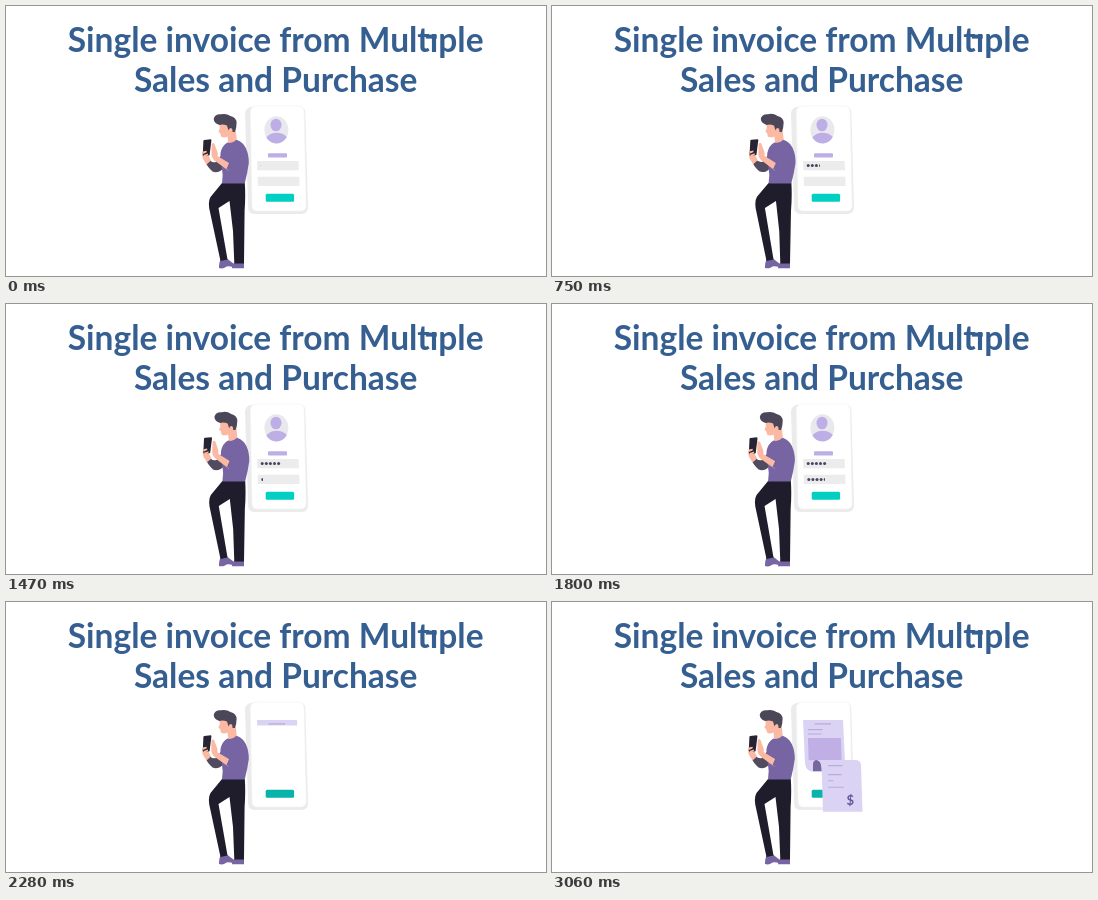
Recreate the animation shown at these times as an HTML page. Size 540 by 270 pixels, loop 3600 ms.

```html
<!DOCTYPE html>
<html lang="en">
<head>
<meta charset="utf-8">
<title>Single invoice</title>
<style>
  html, body { margin: 0; width: 100%; height: 100%; overflow: hidden; background: #fff; }
  svg { display: block; width: 540px; height: 270px; }
  .title { font: 700 33.5px Lato, Carlito, sans-serif; font-variant-ligatures: none; fill: #365f91; text-anchor: middle; }
  .dollar { font: 700 13px Lato, sans-serif; fill: #65549a; text-anchor: middle; }
  .skin { fill: #fbb8a3; }
  .top { fill: #7764a3; }
  .sleeve { fill: #514b60; }
  .pants { fill: #1f1d2b; }
  .hair { fill: #4b4758; }
  .lilac { fill: #bdaee6; }
  .field { fill: #ececec; }
  .dots { fill: #4a4560; }
  .paper { fill: #dad3f4; }
  .lines { stroke: #bbaae0; stroke-width: 1.1; fill: none; }
</style>
</head>
<body>
<svg viewBox="0 0 540 270">
  <defs>
    <clipPath id="clip1"><rect id="type1" x="250" y="150" width="0" height="16"/></clipPath>
    <clipPath id="clip2"><rect id="type2" x="250" y="166" width="0" height="18"/></clipPath>
    <clipPath id="clip3"><rect id="print" x="245" y="118" width="70" height="0"/></clipPath>
  </defs>

  <text class="title" id="line1" x="269.7" y="46">Single invoice from Multiple</text>
  <text class="title" x="269.7" y="86">Sales and Purchase</text>
  <rect id="dot" y="18" height="9" fill="#fff"/>
  <rect id="join" y="28.6" height="4" fill="#365f91"/>

  <!-- phone screen -->
  <path fill="#ebebec" d="M247 100.5H293Q299 100.500 299.300 106L302 201Q302 208 295.500 208H249Q242.500 208 242.200 202L239 108Q239 101 247 100.500Z"/>
  <path fill="#fff" stroke="#f1f1f2" stroke-width=".6" d="M250.500 100H292.500Q298 100 298.200 106L300.200 199Q300 205 294.500 205H251.500Q246.200 205 246 199.500L244.300 106.500Q244.300 100 250.500 100Z"/>
  <g id="form">
    <ellipse cx="270.4" cy="123.8" rx="12" ry="13.600" fill="#e9e8ec"/>
    <ellipse class="lilac" cx="270" cy="119" rx="5.500" ry="6.300"/>
    <path class="lilac" d="M260.300 131.500Q264 126.700 270.500 126.700Q277 126.700 280.900 131Q277 137.400 270.700 137.400Q264 137.400 260.300 131.500Z"/>
    <rect class="lilac" x="262" y="147.200" width="19" height="4.200" rx="1"/>
    <path class="field" d="M251 155H292.500L293 164.300H251.300Z"/>
    <path class="field" d="M251.600 170.700H293.300L293.600 180H252Z"/>
    <g class="dots" id="row1" clip-path="url(#clip1)"></g>
    <g class="dots" id="row2" clip-path="url(#clip2)"></g>
  </g>
  <rect id="button" x="259.700" y="187.800" width="28.400" height="8" rx="1.500"/>

  <!-- receipt -->
  <g clip-path="url(#clip3)">
    <path class="paper" d="M251 118H291L293 160H269V169.500H260Q253.500 168.500 253 161Z"/>
    <path class="lines" d="M262.500 121.900H279M256 127.600H270.500M256 132H269.500"/>
    <path fill="#bfafe4" d="M256 136H288.800L289.600 158.300H256.700Z"/>
    <path fill="#78679f" d="M261 169.300V162.500Q261 158 265 158Q269.700 158.500 269.900 169.300Z"/>
    <path class="paper" d="M265 158H304Q308.800 158.300 309 163L310.500 209.700H271L269.600 166Q269.300 159 265 158Z"/>
    <path class="lines" d="M276 163.600H290.500M276 172.600H289.500M276 178.800H281.500M276 185.200H292"/>
    <text class="dollar" x="298.300" y="202.800">$</text>
  </g>

  <!-- man with phone -->
  <g id="man">
    <path class="top" d="M214.500 253.500L221 252.500Q225 256 229 258.500Q229 261 226 260.700Q221 259.500 219 261.500Q216 263 213 262Q212.800 257 214.500 253.500Z"/>
    <path class="top" d="M228.500 256.500H238V262.300H226Q225.700 260 228.500 256.500Z"/>
    <path class="pants" d="M216 177H238.800Q239.700 190 238.600 205L238 257.500H228.300L227 225L223.500 195L212.500 202L221.500 253.500L214.500 255L204 206Q201.500 196 204.500 191Z"/>
    <path class="sleeve" d="M203 153.500Q206 157 210 156L218 146V162Q212 168 206.500 165.500Q201.500 161 200 157Z"/>
    <path class="skin" d="M197.500 144Q195 148 197 153L200.500 158.500L205 154.500L202.500 149.500L204 145Z"/>
    <path class="skin" d="M213.500 117L213.700 122.500L212.300 126L214 126.800L215 130.500Q217.500 132.300 221.500 130.500L222.500 138.500L231 137L229 116Q221 112 213.500 117Z"/>
    <path class="hair" d="M207.700 113Q208.500 108 215 108.300Q220 107 224.500 110Q230.500 111.500 230.600 117Q230.600 122 228.800 126L226.500 126Q226.700 122 224.500 122Q222.800 122.500 222.500 124.500L221 119.500Q217 118 213.500 119Q208 117.500 207.700 113Z"/>
    <path class="top" d="M221.500 136.500Q226 138 230.600 133.800Q237.500 136.500 239.800 142Q243 149 242.800 157Q241.500 167 238.700 177.500H216Q217.500 169 215.800 161Q213.500 154 214.500 147Q216 139.500 221.500 136.500Z"/>
    <path fill="#262433" d="M198.300 134L204.800 133.300Q205.500 133.600 205.400 134.500L203.600 149.200L198 150Q196.700 149.700 196.800 148.500L197.400 135Q197.500 134.200 198.300 134Z"/>
    <path class="skin" d="M196.700 145.500L200.500 144.700L200.800 146.200L197 148ZM197.500 149L202 147.500L202 149L198 151.500Z"/>
    <g id="hand">
      <path class="skin" d="M205.700 138Q207 136 208.500 138L210.500 143.500Q212.500 147.500 211.500 150L225.500 158.500L222.500 164.700L208.500 154.500Q205 151 205.500 147Z"/>
    </g>
    <path class="top" d="M222.500 153L234 149L237 160Q232 167 225.500 166.300L220.800 163.300L223.800 156.500Z"/>
    <path d="M223.800 156.500L220.800 163.300" stroke="#65538f" stroke-width=".7"/>
  </g>
</svg>
<script>
  const LOOP = 3600, STEP = 30;
  const $ = id => document.getElementById(id);
  const set = (id, attrs) => { for (const k in attrs) $(id).setAttribute(k, attrs[k]); };
  const clamp = v => Math.min(1, Math.max(0, v));
  const span = (t, a, b) => clamp((t - a) / (b - a));
  const mix = (a, b, p) => a + (b - a) * p;

  function addDots(id, x, y) {
    for (let i = 0; i < 5; i++) {
      const c = document.createElementNS("http://www.w3.org/2000/svg", "circle");
      c.setAttribute("cx", x + i * 4.1);
      c.setAttribute("cy", y);
      c.setAttribute("r", 1.5);
      $(id).append(c);
    }
  }
  addDots("row1", 256.2, 159.6);
  addDots("row2", 256.8, 175.5);

  // The "ti" pair shares one crossbar in place of the dot.
  const left = $("line1").getStartPositionOfChar(24).x;
  const right = $("line1").getEndPositionOfChar(24).x;
  set("dot", { x: left + 0.6, width: right - left - 0.6 });
  set("join", { x: left - 4, width: right - left + 2.4 });

  function draw(t) {
    const sway = Math.sin(Math.PI * span(t, 60, 1860)) * 0.45;
    const tap = Math.sin(12 * Math.PI * span(t, 90, 2760)) * 1.5;
    set("man", { transform: `rotate(${sway} 228 258)` });
    set("hand", { transform: `rotate(${tap} 222 160)` });

    set("type1", { width: mix(4.5, 26, span(t, 465, 920)) });
    set("type2", { width: mix(5, 26, span(t, 1430, 1860)) });

    const press = span(t, 1950, 2040);
    set("button", { fill: `rgb(${mix(0, 10, press)},${mix(207, 179, press)},${mix(193, 170, press)})` });
    set("form", { opacity: 1 - span(t, 2040, 2190) });
    set("print", { height: mix(0, 95.5, span(t, 2232, 3060)) });
  }

  const start = performance.now();
  function tick() {
    const t = (performance.now() - start) % LOOP;
    draw(Math.min(3060, Math.floor(t / STEP) * STEP));
    requestAnimationFrame(tick);
  }
  tick();
</script>
</body>
</html>
```
